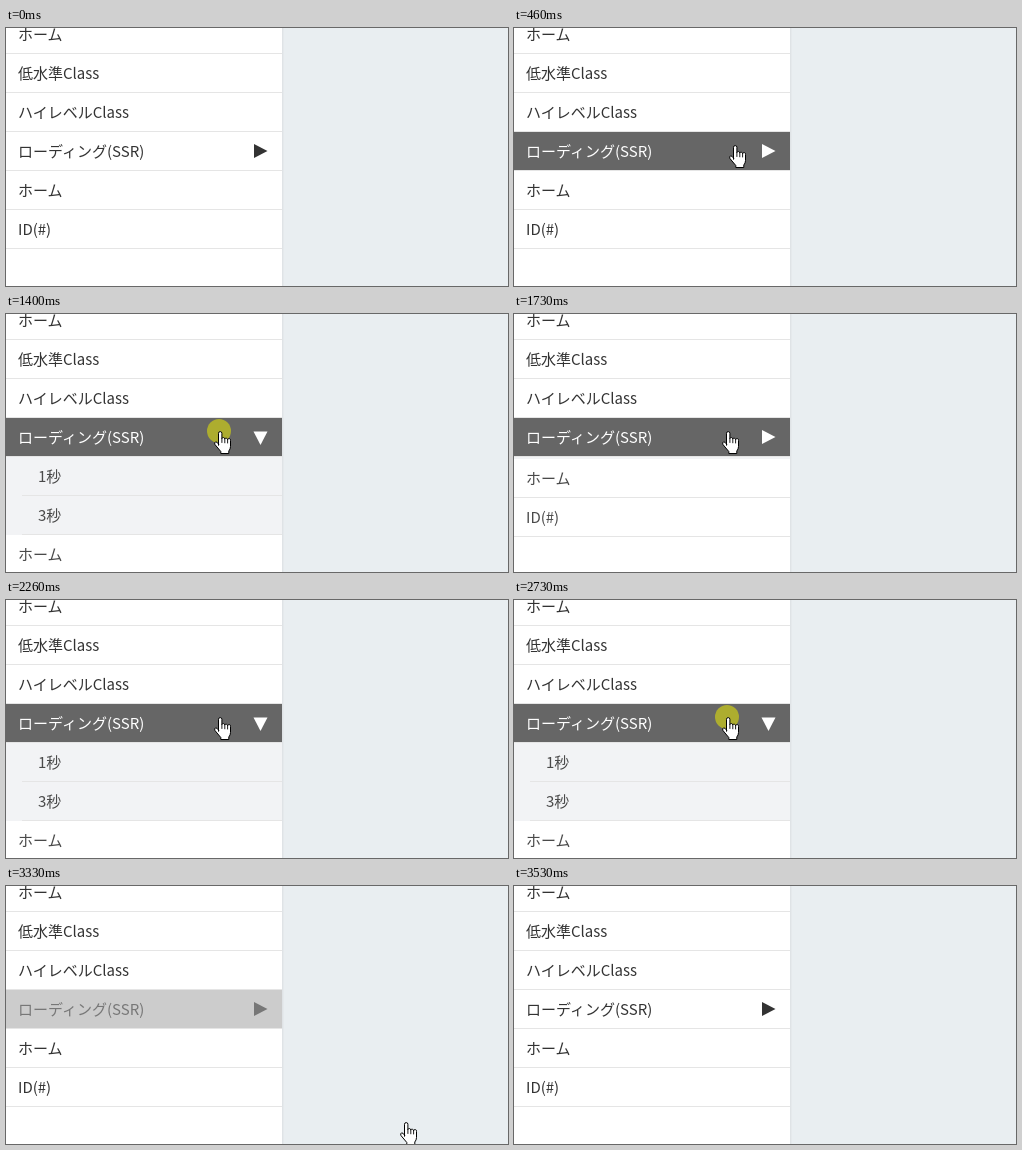
These frames come from a looping animation (502 px wide and 258 px high, 3930 ms). An HTML page:

```html
<!DOCTYPE html>
<html lang="ja">
<head>
<meta charset="utf-8">
<title>Menu</title>
<style>
  html, body { margin: 0; width: 100%; height: 100%; overflow: hidden; background: #e9eef1; }
  svg { display: block; }
  text { font: 15px "Noto Sans CJK JP", "Noto Sans CJK", "Noto Sans", sans-serif; fill: #333; }
  #below.moved text, #sub text { fill: #4a4a4a; }
  .line { fill: #e5e5e5; }
</style>
</head>
<body>
<svg id="stage" width="502" height="258" viewBox="0 0 502 258"></svg>
<script>
const LOOP = 3930, STEP = 66.6, ROW = 39, SUB_HEIGHT = 2 * ROW;

// A menu row; `y` is its bottom divider.
const row = (label, y, x = 12, lineX = 0) =>
  `<text x="${x}" y="${y - 13}">${label}</text>
   <rect class="line" x="${lineX}" y="${y}" width="${276 - lineX}" height="1"/>`;

document.getElementById("stage").innerHTML = `
  <defs><clipPath id="reveal"><rect id="window" y="143" width="276" height="0"/></clipPath></defs>
  <rect width="502" height="258" fill="#e9eef1"/>
  <rect x="276" width="1" height="258" fill="#dfe3e6"/>
  <rect x="277" width="1" height="258" fill="#e5e9ec"/>
  <rect width="276" height="258" fill="#fff"/>
  ${row("ホーム", 25)}${row("低水準Class", 64)}${row("ハイレベルClass", 103)}
  <rect id="bar" y="104" width="276" height="38" fill="#666"/>
  <g id="head">${row("ローディング(SSR)", 142)}</g>
  <path id="arrow" d="M248 116 L261.5 123 L248 130Z"/>
  <g id="sub" clip-path="url(#reveal)">
    <rect y="143" width="276" height="78" fill="#f2f3f5"/>
    ${row("1秒", 181, 32, 16)}${row("3秒", 220, 32, 16)}
  </g>
  <g id="below">${row("ホーム", 181)}${row("ID(#)", 220)}</g>
  <circle id="press" cx="213" cy="117" r="12" fill="#adad2f"/>
  <g id="hand" stroke="#000" stroke-linejoin="round" stroke-linecap="round">
    <path fill="#fff" d="M4.5 14 V2.3 a1.7 1.7 0 0 1 3.4 0 V7.5 a1.5 1.5 0 0 1 2.9 .5
      a1.5 1.5 0 0 1 2.8 .7 a1.5 1.5 0 0 1 2.9 .8 V15.5 Q16.5 18 14.8 20 V22.5 H6.8 V20.5
      L1 13.6 Q0 11.6 1.5 10.9 Q3 10.5 4.5 13Z"/>
    <path fill="none" stroke-width=".9" d="M7.9 7.5 V11.5 M10.8 8 V11.8 M13.6 8.7 V12"/>
  </g>`;

const el = {};
for (const id of ["window", "bar", "head", "arrow", "sub", "below", "press", "hand"])
  el[id] = document.getElementById(id);
const title = el.head.querySelector("text");

const clamp = v => Math.min(1, Math.max(0, v));
const swing = v => 0.5 - Math.cos(clamp(v) * Math.PI) / 2;
const easeOut = v => 1 - (1 - clamp(v)) ** 2.5;
const show = (node, on) => node.setAttribute("visibility", on ? "visible" : "hidden");

// start, duration, opening
const toggles = [[788, 300, true], [1462, 300, false], [1986, 278, true], [2736, 300, false]];
const presses = [[725, 790], [1390, 1460], [1985, 2060], [2655, 2734]];
// time, left, top
const path = [
  [266, 341, 220], [333, 252, 134], [400, 224, 119], [466, 215, 117], [533, 211, 117],
  [600, 208, 117], [3131, 208, 117], [3197, 218, 121], [3264, 290, 162], [3330, 394, 236],
  [3397, 560, 330]
];

function handAt(t) {
  let i = path.findIndex(p => p[0] > t);
  if (i < 0) i = path.length - 1;
  const a = path[Math.max(0, i - 1)], b = path[i];
  const k = a === b ? 0 : clamp((t - a[0]) / (b[0] - a[0]));
  return [1, 2].map(j => Math.round(a[j] + (b[j] - a[j]) * k));
}

function render(time) {
  const t = Math.floor(time / STEP + 0.13) * STEP;

  const last = toggles.filter(s => t >= s[0]).pop();
  const open = !!last && last[2];
  const slide = last ? swing((t - last[0]) / last[1]) : 0;
  const shift = Math.round(SUB_HEIGHT * (open || !last ? slide : 1 - slide));
  el.window.setAttribute("height", shift);
  show(el.sub, shift > 0);
  el.below.setAttribute("transform", `translate(0 ${shift})`);
  el.below.classList.toggle("moved", shift > 0);

  const hover = easeOut((t - 300) / 190) * (1 - easeOut((t - 3230) / 280));
  const grey = Math.round(51 + 204 * hover);
  const ink = `rgb(${grey},${grey},${grey})`;
  el.bar.setAttribute("opacity", hover);
  title.style.fill = ink;
  el.arrow.setAttribute("fill", ink);
  el.arrow.setAttribute("transform", open ? "rotate(90 254 123.5)" : "");

  show(el.press, presses.some(([from, to]) => t >= from && t < to));
  show(el.hand, t > 260 && t < 3390);
  el.hand.setAttribute("transform", `translate(${handAt(t).join(" ")})`);
}

const begin = performance.now();
function tick() {
  render((performance.now() - begin) % LOOP);
  requestAnimationFrame(tick);
}
tick();
</script>
</body>
</html>
```
